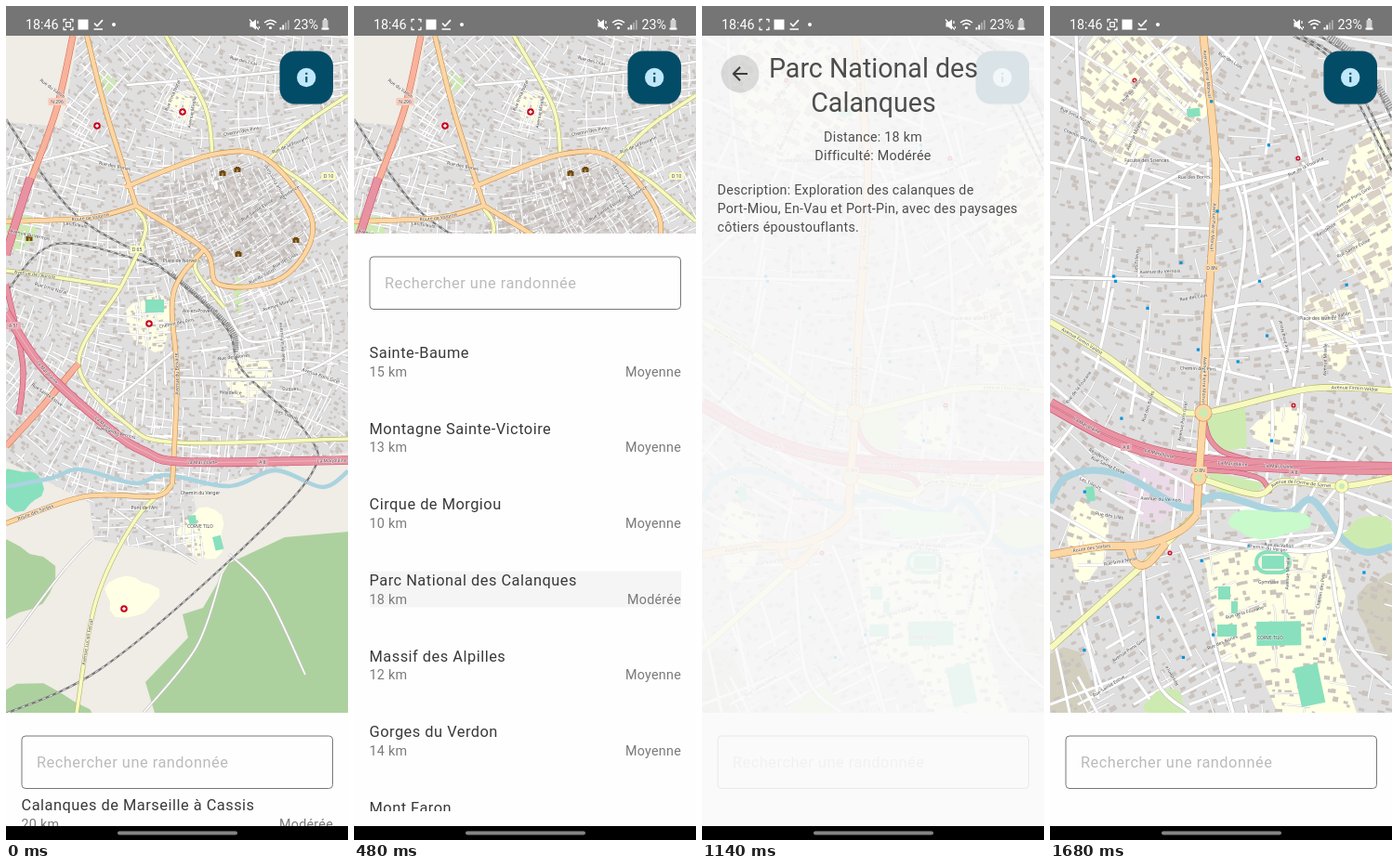
Write an HTML page that moves like this. It is 368x898 px and loops after 1740 ms.

```html
<!DOCTYPE html>
<html lang="fr">
<head>
<meta charset="utf-8">
<style>
html, body { margin: 0; width: 100%; height: 100%; overflow: hidden; background: #fafafa; }
svg { display: block; width: 368px; height: 898px; }
text { font-family: Roboto, sans-serif; }
.map text { font: 5px 'Noto Sans', sans-serif; text-anchor: middle; fill: #444; paint-order: stroke; stroke: #fff; stroke-opacity: .6; stroke-width: 1.2px; }
.big { font-size: 16.36px; letter-spacing: .51px; fill: #38393b; }
.hint { fill: #bbb; }
.small { font-size: 14.31px; letter-spacing: .256px; fill: #7a7a7a; }
.body { font-size: 14.31px; letter-spacing: .256px; fill: #363636; }
.head { font-size: 28.62px; fill: #363636; }
.mid { text-anchor: middle; }
.end { text-anchor: end; }
</style>
</head>
<body>
<svg id="stage" viewBox="0 0 368 898"></svg>
<script>
const LOOP = 1740, STEP = 60;

// ---------- drawing helpers ----------
function random(seed) {
  return () => {
    seed = seed + 0x6D2B79F5 | 0;
    let t = Math.imul(seed ^ seed >>> 15, 1 | seed);
    t = t + Math.imul(t ^ t >>> 7, 61 | t) ^ t;
    return ((t ^ t >>> 14) >>> 0) / 4294967296;
  };
}
let ids = 0;
const fill = (d, color) => `<path d="${d}" fill="${color}"/>`;
const line = (d, color, width, more = '') =>
  `<path d="${d}" fill="none" stroke="${color}" stroke-width="${width}" stroke-linejoin="round" ${more}/>`;
const rect = (x, y, w, h, color, more = '') =>
  `<rect x="${x}" y="${y}" width="${w}" height="${h}" fill="${color}" ${more}/>`;
const dot = (x, y, r, color, more = '') => `<circle cx="${x}" cy="${y}" r="${r}" fill="${color}" ${more}/>`;
const text = (x, y, s, cls) => `<text x="${x}" y="${y}" class="${cls}">${s}</text>`;
const label = (x, y, s, turn = 0) => `<text transform="translate(${x} ${y}) rotate(${turn})">${s}</text>`;
const sign = (x, y, s, color) => rect(x - s.length * 1.7 - 1, y - 4, s.length * 3.4 + 2, 8, color, 'rx="1"') + label(x, y + 2, s);
const cross = (x, y, r) => dot(x, y, r, '#c8001e') + line(`M${x - r / 2},${y}h${r}M${x},${y - r / 2}v${r}`, '#fff', r / 3);
const museum = (x, y) => rect(x - 3.5, y - 2, 3, 5, '#734a08') + rect(x + .5, y - 2, 3, 5, '#734a08') + rect(x - 2, y - 3, 4, 3, '#734a08');
const pitch = (x, y, w, h, turn = 0) => rect(x, y, w, h, '#88e0be', `transform="rotate(${turn} ${x} ${y})"`);

// Uneven closed outline around an ellipse
function blob(x, y, rx, ry) {
  let d = '';
  for (let a = 0; a < 6.28; a += .35) {
    const r = 1 + .12 * Math.sin(3 * a + x) + .07 * Math.cos(5 * a + y);
    d += `${d ? 'L' : 'M'}${x + rx * r * Math.cos(a)},${y + ry * r * Math.sin(a)}`;
  }
  return d + 'Z';
}

// Smooth curve through "x,y x,y ..."
function curve(s) {
  const p = s.split(' ').map(q => q.split(',').map(Number));
  let d = 'M' + p[0];
  for (let i = 0; i < p.length - 1; i++) {
    const b = p[i], c = p[i + 1], a = p[i - 1] || b, e = p[i + 2] || c;
    d += `C${[0, 1].map(k => b[k] + (c[k] - a[k]) / 6)} ${[0, 1].map(k => c[k] - (e[k] - b[k]) / 6)} ${c}`;
  }
  return d;
}
function roads(width, [color, edge], ...paths) {
  const d = paths.map(curve).join('');
  return line(d, edge, width + 1.2) + line(d, color, width);
}
function rail(...paths) {
  const d = paths.map(curve).join('');
  return line(d, '#777', 2.2) + line(d, '#ddd', 1.1, 'stroke-dasharray="4 4"');
}
// Street name written along a road, at given percentages of its length
function named(path, name, ...spots) {
  const id = 'way' + ids++;
  return `<path id="${id}" d="${curve(path)}" fill="none"/>` +
    spots.map(s => `<text dy="1.8"><textPath href="#${id}" startOffset="${s}%">${name}</textPath></text>`).join('');
}

// Slowly turning direction that streets, houses and small names follow
const heading = (x, y) => .15 + .4 * Math.sin(x / 80 + y / 200) + .35 * Math.cos(y / 75);

function town(outline, { seed, cell, street, rate, house, houses, color = '#cac3be' }) {
  const rnd = random(seed), id = 'area' + ids++;
  let lanes = '', blocks = '';
  for (let y = 32; y < 765; y += cell) for (let x = 0; x < 370; x += cell) {
    const a = heading(x, y), c = Math.cos(a), s = Math.sin(a);
    if (rnd() < rate) {
      const n = cell * (1 + rnd() * 3), [u, v] = rnd() < .5 ? [c, s] : [-s, c];
      lanes += `M${x},${y}q${u * n / 2 + rnd() * 3},${v * n / 2} ${u * n},${v * n}`;
    }
    for (let i = 0; i < houses; i++) {
      const w = house * (.5 + rnd()), h = house * (.4 + rnd() * .6);
      blocks += `M${x + rnd() * cell},${y + rnd() * cell}l${c * w},${s * w} ${-s * h},${c * h} ${-c * w},${-s * w}z`;
    }
  }
  return `<clipPath id="${id}"><path d="${outline}"/></clipPath><g clip-path="url(#${id})">` +
    fill(blocks, color) + line(lanes, '#c6c4c4', street + .7) + line(lanes, '#fff', street) + '</g>';
}

const NAMES = ['Rue des Lilas', 'Rue du Vallon', 'Rue Irma Noral', 'Avenue Mirelle', 'Chemin des Pins', 'Rue de la Fourane',
  'Rue des Bories', 'Avenue Pons Girel', 'Résidence', 'Rue Sainte Estive', 'Les Tilleuls', 'Avenue du Vernois'];
function smallNames(seed, count, top, bottom) {
  const rnd = random(seed);
  return Array.from({ length: count }, (_, i) => {
    const x = 25 + rnd() * 320, y = top + (bottom - top) * (i + rnd()) / count;
    return label(x, y, NAMES[i % NAMES.length], heading(x, y) * 57.3 - (rnd() < .4 ? 90 : 0));
  }).join('');
}

// ---------- maps ----------
const ORANGE = ['#fcd6a4', '#c98f45'], YELLOW = ['#f7fabf', '#b4b268'], PINK = ['#e892a2', '#c9506f'],
  SALMON = ['#f9b29c', '#cf7453'], WHITE = ['#fff', '#c2c0c0'];
const SCHOOL = '#ffffe5', WOOD = '#add19e', GRASS = '#cdebb0', WATER = '#aad3df';

function cityMap() {
  const suburb = 'M0,125L60,130 78,32 368,32V480L200,520 215,595 95,575 90,535 0,490Z';
  const core = blob(232, 232, 90, 58);
  const a8 = '0,330 40,390 110,454 150,480 195,491 368,489';
  const galice = '0,232 90,228 140,215', europe = '0,285 40,290 125,303', milles = '0,557 85,528 160,528 179,515';
  const spine = '179,515 184,400 180,310 213,262', south = '76,761 97,640 140,552 179,515';
  return rect(0, 32, 368, 729, '#f0ece6') + fill(suburb, '#e0dfdf') + fill(core, '#d6d3d2') +
    fill('M368,566L300,572 240,600 212,648 190,655 196,680 150,728 160,761H368Z' + blob(8, 618, 42, 40) + blob(25, 768, 72, 34), WOOD) +
    fill(blob(15, 242, 18, 20) + blob(108, 82, 9, 10) + blob(250, 311, 4, 20), GRASS) +
    fill(blob(155, 340, 24, 30) + blob(212, 568, 24, 28) + blob(134, 636, 28, 22) + blob(192, 108, 18, 18) + blob(260, 400, 26, 25), SCHOOL) +
    town(suburb, { seed: 5, cell: 10, street: 1.5, rate: .5, house: 3.6, houses: 2 }) +
    town(core, { seed: 9, cell: 8, street: 1, rate: .5, house: 4, houses: 2, color: '#c3bcb8' }) +
    fill(blob(15, 520, 24, 22), '#88e0be') + pitch(150, 316, 20, 14) + pitch(196, 549, 8, 10, -8) + pitch(222, 572, 9, 15, -14) +
    line(curve('0,518 50,508 80,499 138,514 172,505 240,517 290,500 340,518 368,501'), WATER, 4.5) +
    roads(1.7, WHITE, '240,590 280,632 322,720', '0,690 60,610 92,575', '148,761 205,690 232,612', '115,540 150,565 205,600') +
    rail('0,122 72,222 165,280 236,345 254,392 322,458 328,505 232,605 100,715 0,762', '0,308 55,256 165,280') +
    line(curve('178,288 240,345 248,372'), '#888', 5, 'stroke-dasharray="1.2 1"') +
    roads(2.6, WHITE, '130,85 280,72 368,60', '0,175 110,150', '185,400 300,400 368,370', '225,298 260,360 330,345', '110,430 180,372') +
    roads(3.6, YELLOW, '172,32 214,108 222,160', '282,166 318,130 368,96', '282,166 320,190 368,232',
      '140,218 150,243 125,300 78,385 130,450 185,470 368,466', '213,262 204,284 235,325', europe, south) +
    roads(6, SALMON, '72,32 54,112 22,200', '0,474 40,430 78,385') +
    roads(4.4, ORANGE, '87,32 108,115 140,215', '128,195 222,160 282,166 330,235 298,292 230,300 213,262 140,215', galice, spine, milles) +
    roads(8, PINK, '26,185 13,225 0,268') + roads(5, PINK, '0,300 18,385 14,440') + roads(8.5, PINK, a8) + line(curve(a8), '#f4c6cf', .7) +
    [[98, 129], [190, 114], [154, 342], [127, 649]].map(([x, y]) => cross(x, y, 3.8)).join('') +
    [[233, 180], [249, 176], [312, 252], [250, 267], [25, 250]].map(([x, y]) => museum(x, y)).join('') +
    sign(55, 103, 'N 296', '#f9c8b6') + sign(141, 262, 'D 65', YELLOW[0]) + sign(8, 344, 'A 51', '#e9a8b4') +
    sign(276, 491, 'A 8', '#e9a8b4') + sign(347, 183, 'D 10', YELLOW[0]) +
    named(a8, 'La Marjolaine', 18, 38, 64, 96) + named(galice, 'Route de Valorne', 64) + named(europe, 'Avenue de l\'Aurore', 25) +
    named(milles, 'Route des Sorbes', 18) + named(spine, 'Avenue du Belvaire', 45) + named(south, 'Avenue Lucien Ferval', 28) +
    label(209, 526, 'Chemin du Verger') + label(209, 330, 'Aix-en-Provence') + label(149, 542, 'Pont de l\'Arc') + label(306, 414, 'Cuques') +
    label(209, 562, 'CORVE TILO') + label(187, 276, 'Place de Norvel') + smallNames(3, 24, 60, 470);
}

function districtMap() {
  const rnd = random(21);
  const a8 = '0,429 60,462 110,480 165,490 260,496 368,498';
  const spine = '165,32 177,150 178,200 168,360 165,438 160,508 158,548', mills = '0,591 55,582 102,580 140,565 158,548';
  const berger = '0,340 62,378 125,426 165,438 280,412 368,414', meyran = '160,508 222,526 250,512 314,517 368,508';
  const viaduct = '158,572 190,578 300,583 314,517';
  const stops = Array.from({ length: 24 }, () => rect(rnd() * 365, 60 + rnd() * 690, 3.2, 3.2, '#0092da')).join('');
  const campus = blob(96, 92, 70, 70), faculty = blob(345, 225, 36, 88) + blob(305, 345, 32, 42);
  const track = rect(222, 588, 36, 22, '#f5f5df', 'rx="11" stroke="#88e0be" stroke-width="4"') + pitch(228, 592, 24, 14);
  return rect(0, 32, 368, 729, '#e0dfdf') +
    fill(campus + faculty + blob(40, 575, 22, 42) + blob(250, 456, 30, 24) + 'M165,588L300,582 318,635 306,690 330,761H245L222,708 184,706Z', SCHOOL) +
    fill(blob(5, 735, 45, 40) + blob(368, 655, 34, 48), '#d2cfbf') + fill(blob(115, 520, 38, 34), '#ebdbe8') +
    town('M0,32H368V761H0Z', { seed: 31, cell: 12, street: 1.3, rate: .1, house: 5.5, houses: 1 }) +
    town('M0,32H368V585H0Z', { seed: 8, cell: 34, street: 3.2, rate: .5, house: 0, houses: 0 }) +
    town('M0,600H165L215,761H0Z', { seed: 17, cell: 30, street: 3, rate: .5, house: 0, houses: 0 }) +
    town(campus + faculty, { seed: 44, cell: 18, street: 1, rate: .15, house: 11, houses: 1, color: '#d9d0c6' }) +
    fill('M168,442L210,432 212,475 186,480 170,468Z' + 'M166,500L232,514 218,528 184,524Z' + blob(345, 570, 30, 20) + blob(125, 752, 22, 16), GRASS) +
    line(curve('0,535 14,510 45,500 85,508 145,540 182,527 252,546 282,532 315,574 340,588 368,582'), WATER, 7.5) +
    fill(blob(235, 557, 45, 15), '#c8facc') + track +
    pitch(181, 625, 13, 14) + pitch(195, 641, 7, 13) + pitch(180, 666, 21, 13) + pitch(222, 663, 48, 26, -1) +
    pitch(262, 713, 26, 43, -12) + pitch(38, 518, 9, 16, -8) + pitch(147, 111, 14, 9, -6) +
    [0, 8, 28].map(x => rail(`${262 + x},32 ${310 + x},66 368,${178 - x * 2}`)).join('') +
    line(curve('300,32 335,62 368,112'), '#999', 8, 'stroke-dasharray="1.5 1.2"') +
    roads(3.6, WHITE, '0,278 40,240 95,205 160,170', '28,32 32,110 45,235', '0,292 165,296', '178,150 210,240 180,430', '222,32 262,135 270,165',
      '262,190 270,340 262,410', '176,328 240,322 330,362', '100,603 112,720 150,761', '140,580 160,630 197,761', '300,583 318,680 368,735') +
    roads(4.6, WHITE, '178,197 240,182 300,168', viaduct) +
    roads(4.5, PINK, '166,446 172,466 186,480 215,489', '164,500 200,502 228,510 236,525') +
    roads(13, PINK, a8) + line(curve(a8), PINK[1], 1.6) + line(curve(a8), '#f6d5dc', .7) +
    roads(6, YELLOW, berger, meyran, '0,692 38,658 98,604 130,574 156,548') + roads(7.5, ORANGE, spine, mills, '84,582 92,600 106,600 125,578') +
    [[165, 438, 7, ORANGE], [160, 508, 6, ORANGE], [314, 517, 5, YELLOW]].map(([x, y, r, [color, edge]]) =>
      dot(x, y, r, GRASS, `stroke="${edge}" stroke-width="5"`) + dot(x, y, r, GRASS, `stroke="${color}" stroke-width="3.8"`)).join('') +
    stops + [[91, 80], [262, 430], [267, 164], [129, 589]].map(([x, y]) => cross(x, y, 2.5)).join('') +
    sign(174, 282, 'D 8N', ORANGE[0]) + sign(161, 500, 'D 8N', ORANGE[0]) + sign(82, 475, 'A 8', '#e9a8b4') + sign(263, 502, 'A 8', '#e9a8b4') +
    named(a8, 'La Marjolaine', 12, 34, 55, 68) + named(berger, 'Avenue Firmin Valdot', 10, 90) + named(meyran, 'Avenue de l\'Orme de Sarnel', 54) +
    named(spine, 'Avenue Pierre Monval', 8, 40, 72) + named(mills, 'Route des Sorbes', 27) + named(viaduct, 'Chemin du Verger', 36) +
    label(237, 682, 'CORVE TILO') + label(104, 168, 'Faculté des Sciences') + label(288, 338, 'Place des Lettres') + label(235, 622, 'Gymnase') +
    smallNames(6, 34, 60, 750);
}

// ---------- screens ----------
const hikes = [
  ['Calanques de Marseille à Cassis', 20, 'Modérée'], ['Mont Puget', 12, 'Difficile'], ['Cap Canaille', 8, 'Modérée'],
  ['Sainte-Baume', 15, 'Moyenne'], ['Montagne Sainte-Victoire', 13, 'Moyenne'], ['Cirque de Morgiou', 10, 'Moyenne'],
  ['Parc National des Calanques', 18, 'Modérée'], ['Massif des Alpilles', 12, 'Moyenne'], ['Gorges du Verdon', 14, 'Moyenne'],
  ['Mont Faron', 9, 'Moyenne']];
const PRESSED = 6;

// Sheet coordinates: 0 is the upper edge of the sheet
const rows = hikes.map(([name, km, level], i) => {
  const y = 105 + i * 81.67;
  return (i === PRESSED ? rect(17, y - 15.5, 335, 39, '#000', 'id="press"') : '') +
    text(16.5, y, name, 'big') + text(16.5, y + 19.5, km + ' km', 'small') + text(352, y + 19.5, level, 'small end');
}).join('');

const button = rect(294.5, 49.5, 57.5, 57, '#000', 'rx="16.4" opacity=".12"') + rect(294.5, 48.5, 57.5, 57, '#034c67', 'rx="16.4"') +
  dot(323.2, 77, 10.2, '#c0e8fa') + rect(322.2, 76, 2.1, 6.2, '#034c67') + rect(322.2, 71.8, 2.1, 2.1, '#034c67');

const sheet = rect(0, 0, 368, 660, '#fefefe') + rect(17, 25, 334.5, 56.5, 'none', 'rx="4" stroke="#777"') +
  text(33, 59, 'Rechercher une randonnée', 'big hint') +
  `<clipPath id="view"><rect y="82" width="368" height="540"/></clipPath><g id="list" clip-path="url(#view)"><g id="rows">${rows}</g></g>`;

const detail = dot(41, 73, 20.4, '#000', 'id="ripple"') + line('M49,73H34.5M41,65.8L33.8,73L41,80.2', '#222', 2) +
  text(184.5, 77, 'Parc National des', 'head mid') + text(184.5, 113.5, 'Calanques', 'head mid') +
  text(184, 145.5, 'Distance: 18 km', 'body mid') + text(184, 165.5, 'Difficulté: Modérée', 'body mid') +
  ['Description: Exploration des calanques de', 'Port-Miou, En-Vau et Port-Pin, avec des paysages', 'côtiers époustouflants.']
    .map((s, i) => text(16.5, 202.5 + i * 20.4, s, 'body')).join('');

const bars = rect(0, 0, 368, 32, '#757575') + '<g fill="#fff" font-size="14.3">' +
  text(21, 24.5, '18:46', '') + text(309.5, 24.5, '23%', '') +
  line('M62,17.5v-3h3M69,14.5h3v3M72,22.5v3h-3M65,25.5h-3v-3', '#fff', 1.3) +
  rect(64.7, 17.6, 4.6, 4.8, 'none', 'id="scan" stroke="#fff" stroke-width="1.2"') +
  rect(77.5, 14.5, 11, 11, '#fff') + line('M95,18.5l3,3.2l6,-6.5M94.5,25h9.5', '#fff', 1.7) + dot(116, 20, 2, '#fff') +
  '<path d="M262.500,17.500h2.500l4,-3v11l-4,-3h-2.500z"/>' + line('M262,14.5l10,11M271,16v3M272.5,22v2', '#fff', 1.2) +
  line('M278,18q6.5,-5.5 13,0M280.3,20.5q4.2,-3.5 8.4,0', '#fff', 1.5) + dot(284.5, 23.5, 1.6, '#fff') +
  [0, 1, 2, 3].map(i => rect(294.5 + i * 2.8, 23 - i * 2.6, 1.9, 2.5 + i * 2.6, '#fff', i > 1 ? 'opacity=".4"' : '')).join('') +
  rect(340.5, 15, 6, 10.5, '#fff', 'rx="1" opacity=".65"') + rect(342, 13.5, 3, 1.5, '#fff') + rect(339.5, 23.5, 8, 2, '#fff') + '</g>' +
  rect(0, 883, 368, 15, '#000') + rect(120, 888.5, 129, 4, '#858585', 'rx="2"');

const $ = id => document.getElementById(id);
$('stage').innerHTML = rect(0, 0, 368, 898, '#fafafa') +
  `<g id="home"><g id="city" class="map">${cityMap()}</g><g id="district" class="map">${districtMap()}</g>` +
  `<g id="sheet">${sheet}</g>${button}</g><g id="detail">${detail}</g>${bars}`;

// ---------- motion ----------
const ramp = (t, from, to) => Math.min(1, Math.max(0, (t - from) / (to - from)));
const smooth = u => u * u * (3 - 2 * u);
const show = (id, on) => $(id).setAttribute('display', on ? 'inline' : 'none');
const fade = (id, value) => $(id).setAttribute('opacity', value);
const shift = (id, y) => $(id).setAttribute('transform', `translate(0 ${y})`);

function draw(t) {
  const back = t >= 900;
  const visible = back ? smooth(ramp(t, 1089, 1319)) : 1 - smooth(ramp(t, 485, 715));
  show('city', !back);
  show('district', back);
  show('list', !back);
  shift('sheet', back ? 761 : 761 - 516 * smooth(ramp(t, 0, 120)));
  shift('rows', -216 * (1 - (1 - ramp(t, 150, 443)) ** 3));
  fade('press', .13 * ramp(t, 450, 560));
  fade('home', visible);
  fade('detail', 1 - visible);
  fade('ripple', .14 * ramp(t, 980, 1060) * (1 - ramp(t, 1150, 1240)));
  $('ripple').setAttribute('r', 20.4 * (.5 + .5 * ramp(t, 980, 1100)));
  show('scan', t < 480 || t >= 1200);
}

let last = -1;
function tick(now) {
  const t = Math.floor(now % LOOP / STEP) * STEP;
  if (t !== last) draw(last = t);
  requestAnimationFrame(tick);
}
draw(0);
requestAnimationFrame(tick);
</script>
</body>
</html>
```
